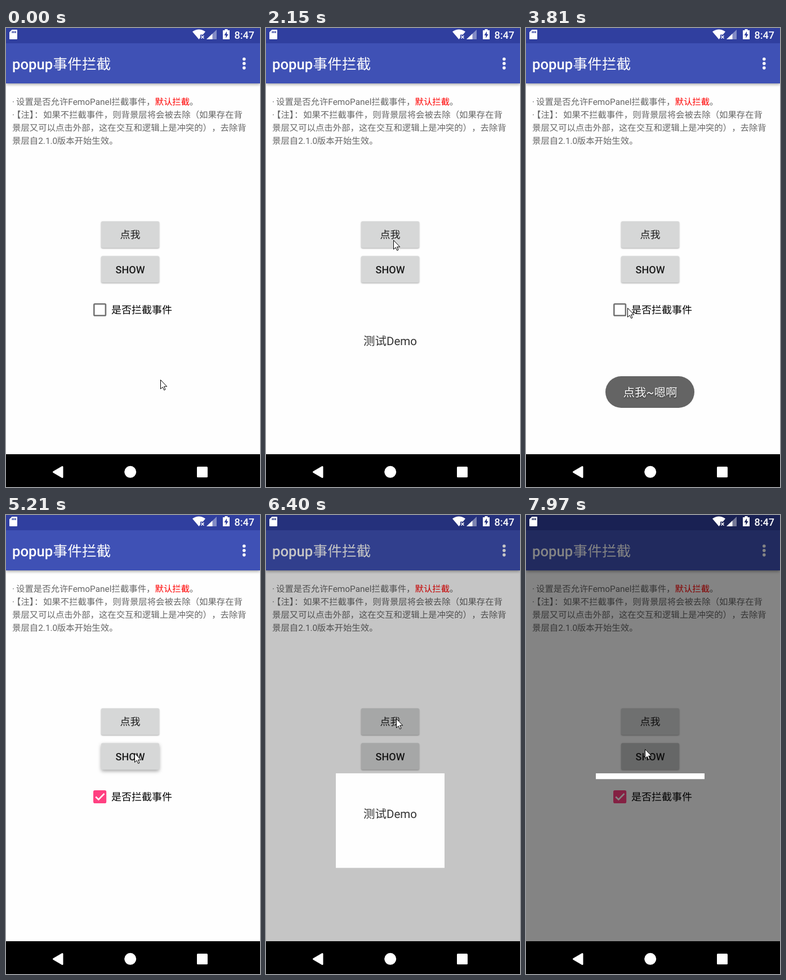
Animation, 451 px wide and 812 px high, one loop 7990 ms. Source, as an HTML page with a canvas:

```html
<!DOCTYPE html>
<html lang="zh-CN">
<head>
<meta charset="utf-8">
<title>popup</title>
<style>
html, body { margin: 0; width: 100%; height: 100%; overflow: hidden; background: #fefefe; }
canvas { display: block; }
</style>
</head>
<body>
<canvas id="stage" width="451" height="812"></canvas>
<script>
const ctx = document.getElementById('stage').getContext('2d');
const LOOP = 7990;
const FAMILY = 'Roboto, "Noto Sans CJK SC", "Noto Sans CJK", "Noto Sans", sans-serif';
const PAPER = '#fefefe';
const BOTTOM = 754;   // top of the navigation bar

const SHOW = { y: 403.5, label: 'SHOW', base: 434, weight: 500, taps: [[1060, 1270], [5160, 5390], [7580, 7800]] };
const POKE = { y: 342, label: '点我', base: 372, weight: 400, taps: [[2450, 2640]] };
const POPUPS = [[1310, 2450], [5395, 6315], [7920, 9000]];   // slide in, slide out
const DIMS = [[5390, 6322], [7826, 9000]];                   // fade in, fade out

// time, x, y of the pointer tip
const POINTER = [
  [40, 274, 622], [250, 341, 575], [450, 325, 500], [620, 262, 450], [780, 232, 440],
  [1900, 232, 440], [2060, 231, 409], [2150, 226, 375], [2860, 226, 375], [3230, 224, 470],
  [3500, 196, 505], [3810, 180, 495], [4020, 180, 495], [4110, 173, 495], [4560, 173, 495],
  [4920, 228, 421], [5720, 228, 421], [6000, 231, 360], [7070, 231, 360], [7280, 206, 426],
  [7430, 211, 414]
];

const SD = new Path2D('M10.5 3H19Q20 3 20 4V19Q20 20 19 20H7Q6 20 6 19V7.5ZM10.5 5.5h1.7v3.5h-1.7zM13.3 5.5h1.7v3.5h-1.7zM16.1 5.5h1.7v3.5h-1.7z');
const WIFI = new Path2D('M331 6.5Q342.5-1.5 354 6.5L349.7 11.8H345V17L342.5 20Z');
const WIFI_X = new Path2D('M346.5 13.5L351.5 18.5M351.5 13.5L346.5 18.5');
const SIGNAL = new Path2D('M374 3V20H356Z');
const SIGNAL_ON = new Path2D('M366.5 10V20H356Z');
const BATTERY = new Path2D('M385 4h3.5v-2h5v2h3.5v16h-12zM392 6L387.5 13H390.3V18L394.7 11H392Z');
const BACK = new Path2D('M84.5 785.5L100 776.5V794.5Z');
const ARROW = new Path2D('M.5.5V16.5L4.2 13.2L6.7 18.6L9 17.6L6.6 12.2H11.7Z');

const ramp = (t, start, length) => Math.min(1, Math.max(0, (t - start) / length));
const smooth = k => (1 - Math.cos(Math.PI * k)) / 2;
const cubicOut = k => 1 - (1 - k) ** 3;

ctx.textRendering = 'geometricPrecision';

function text(str, x, y, size, color, weight = 400, align = 'left') {
  ctx.font = `${weight} ${size}px ${FAMILY}`;
  ctx.textAlign = align;
  ctx.fillStyle = color;
  ctx.fillText(str, x, y);
}

function rect(x, y, w, h, color) {
  ctx.fillStyle = color;
  ctx.fillRect(x, y, w, h);
}

function round(x, y, w, h, r) {
  ctx.beginPath();
  ctx.roundRect(x, y, w, h, r);
}

function disc(x, y, r, color) {
  ctx.beginPath();
  ctx.arc(x, y, r, 0, 7);
  ctx.fillStyle = color;
  ctx.fill();
}

function shadow(color, blur, dy) {
  ctx.shadowColor = color;
  ctx.shadowBlur = blur;
  ctx.shadowOffsetY = dy;
}

function pointerAt(t) {
  const i = POINTER.findIndex(p => p[0] > t);
  if (i === 0) return POINTER[0].slice(1);
  if (i < 0) return POINTER.at(-1).slice(1);
  const [t0, x0, y0] = POINTER[i - 1], [t1, x1, y1] = POINTER[i];
  const k = (t - t0) / (t1 - t0);
  return [x0 + (x1 - x0) * k, y0 + (y1 - y0) * k];
}

function header() {
  ctx.save();
  shadow('rgba(0,0,0,.35)', 5, 2);
  rect(0, 27, 451, 71, '#3f51b5');
  ctx.restore();
  rect(0, 0, 451, 27, '#303f9f');
  text('popup', 11, 73, 25.66, '#fff', 500);
  text('事件拦截', 83.6, 73, 25.66, '#fff');
  for (const y of [55, 62.8, 70.6]) disc(422.8, y, 2.8, '#fff');
}

function notes() {
  const put = (str, x, line, color = '#666') => text(str, x, 136.3 + line * 23, 15.4, color);
  put('·', 11, 0);
  put('设置是否允许', 18, 0);
  put('FemoPanel', 110.3, 0);
  put('拦截事件，', 187.5, 0);
  put('默认拦截', 264.5, 0, '#f00');
  put('。', 326, 0);
  // Brackets are set half-width here, so each piece gets its own start.
  put('·', 11, 1);
  put('【', 11, 1);
  put('注】', 26.4, 1);
  put('：', 50, 1);
  put('如果不拦截事件，则背景层将会被去除（如果存在背', 66, 1);
  put('景层又可以点击外部，这在交互和逻辑上是冲突的）', 11, 2);
  put('，去除背', 365.2, 2);
  put('景层自2.1.0', 11, 3);
  put('版本开始生效。', 90.8, 3);
}

function button({ y, label, base, weight, taps }, t) {
  const lift = taps.reduce((sum, [down, up]) => sum + ramp(t, down, 60) - ramp(t, up, 100), 0);
  ctx.save();
  shadow('rgba(0,0,0,.35)', 2.5 + 5 * lift, 1 + 2 * lift);
  round(169, y, 103, 47, 2.5);
  ctx.fillStyle = '#d6d7d7';
  ctx.fill();
  ctx.restore();
  ctx.save();
  ctx.clip();
  for (const [, up] of taps) {
    const fade = 1 - ramp(t, up + 300, 350);
    if (t > up && fade > 0) disc(228, y + 27, 90 * cubicOut(ramp(t, up, 250)), `rgba(0,0,0,${.08 * fade})`);
  }
  ctx.restore();
  text(label, 220.5, base, 18, '#1c1c1c', weight, 'center');
}

function checkbox(t) {
  const glow = ramp(t, 4410, 100) * (1 - ramp(t, 4560, 250));
  if (glow) disc(166.7, 498.5, 25 * ramp(t, 4410, 150), `rgba(0,0,0,${.1 * glow})`);
  const on = ramp(t, 4510, 140);
  round(156.3, 488.2, 20.6, 20.6, 1.5);
  ctx.lineWidth = 2.6;
  ctx.strokeStyle = on ? '#ff4081' : '#737373';
  ctx.stroke();
  if (on) {
    ctx.fillStyle = '#ff4081';
    ctx.fill();
    ctx.save();
    ctx.globalAlpha = on;
    ctx.beginPath();
    ctx.moveTo(159.3, 498.5);
    ctx.lineTo(164.3, 503.5);
    ctx.lineTo(174.5, 493);
    ctx.strokeStyle = '#fff';
    ctx.stroke();
    ctx.restore();
  }
  text('是否拦截事件', 187, 505.3, 18, '#000');
}

function toast(t) {
  ctx.save();
  ctx.globalAlpha = ramp(t, 2680, 300) * (1 - ramp(t, 4620, 300));
  round(141, 616, 158, 56, 28);
  ctx.fillStyle = '#646464';
  ctx.fill();
  shadow('rgba(0,0,0,.7)', 2, 1);
  text('点我~嗯啊', 220.5, 652.3, 20.5, '#fff', 400, 'center');
  ctx.restore();
}

function dim(t) {
  for (const [start, end] of DIMS) {
    const k = cubicOut(ramp(t, start, 300)) - cubicOut(ramp(t, end, 300));
    rect(0, 0, 451, BOTTOM, `rgba(0,0,0,${.56 * k})`);
  }
}

// The panel slides down from behind its top edge.
function panel(t) {
  for (const [start, end] of POPUPS) {
    const h = 192 * (smooth(ramp(t, start, 340)) - smooth(ramp(t, end, 370)));
    if (h <= 0) continue;
    ctx.save();
    ctx.beginPath();
    ctx.rect(124, 457, 193, h);
    ctx.clip();
    rect(124, 457, 193, h, PAPER);
    text('测试Demo', 220.5, 457 + h - 88.2, 20.5, '#333', 400, 'center');
    ctx.restore();
  }
}

function systemBars() {
  ctx.fillStyle = '#fff';
  ctx.fill(SD, 'evenodd');
  ctx.fill(WIFI);
  ctx.fill(SIGNAL_ON);
  ctx.fill(BATTERY, 'evenodd');
  ctx.strokeStyle = '#fff';
  ctx.lineWidth = 1.6;
  ctx.stroke(WIFI_X);
  ctx.fillStyle = 'rgba(255,255,255,.4)';
  ctx.fill(SIGNAL);
  text('8:47', 405.5, 19, 18, '#fff', 500);

  rect(0, BOTTOM, 451, 812 - BOTTOM, '#000');
  ctx.fillStyle = '#fff';
  ctx.lineWidth = 3;
  ctx.lineJoin = 'round';
  ctx.fill(BACK);
  ctx.stroke(BACK);
  disc(220.7, 785.3, 10.5, '#fff');
  round(339, 776, 19, 19, 1.5);
  ctx.fill();
  ctx.lineJoin = 'miter';
}

function pointer(t) {
  ctx.save();
  ctx.translate(...pointerAt(t));
  ctx.fillStyle = '#fff';
  ctx.fill(ARROW);
  ctx.strokeStyle = '#000';
  ctx.lineWidth = 1;
  ctx.stroke(ARROW);
  ctx.restore();
}

function draw(t) {
  rect(0, 0, 451, 812, PAPER);
  header();
  notes();
  button(POKE, t);
  button(SHOW, t);
  checkbox(t);
  dim(t);
  panel(t);
  toast(t);
  systemBars();
  pointer(t);
}

const began = performance.now();
function tick() {
  draw((performance.now() - began) % LOOP);
  requestAnimationFrame(tick);
}
tick();
</script>
</body>
</html>
```
